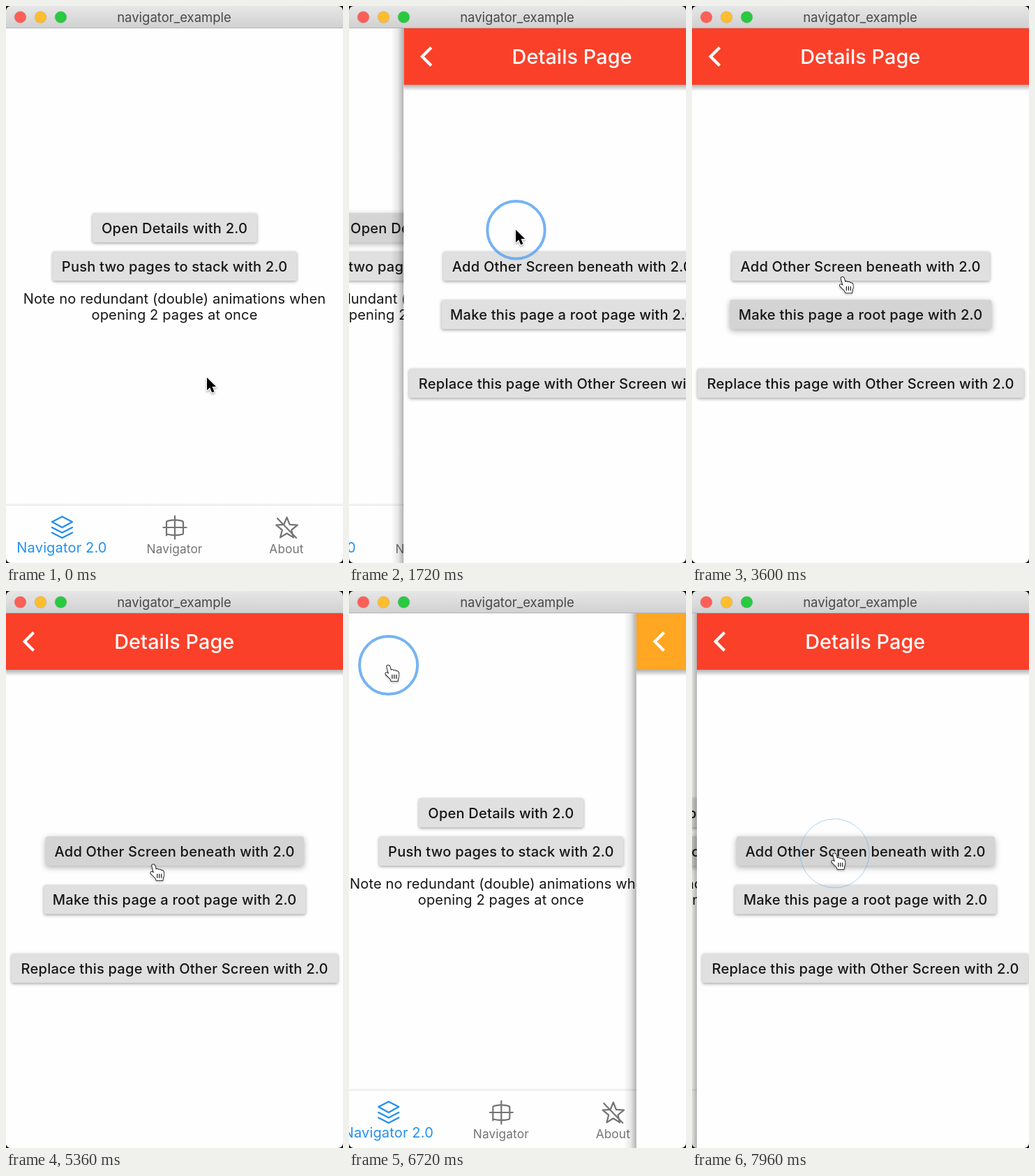
An HTML page with a canvas that plays this animation: 483x799 px, repeating every 8 s.

```html
<!DOCTYPE html>
<html lang="en">
<head>
<meta charset="utf-8">
<title>navigator_example</title>
<style>
  html, body { margin: 0; width: 100%; height: 100%; overflow: hidden; background: #000; }
  canvas { display: block; width: 483px; height: 799px; }
</style>
</head>
<body>
<canvas id="stage"></canvas>
<script>
const W = 483, H = 799, LOOP = 8000, BAR = 32, HEADER_BOTTOM = 113, SLIDE = 400;
const canvas = document.getElementById('stage');
const ctx = canvas.getContext('2d');
const dpr = window.devicePixelRatio || 1;
canvas.width = W * dpr;
canvas.height = H * dpr;

const RED = '#fb4029', ORANGE = '#ff9800', BLUE = '#2490ee', GREY = '#747474', INK = '#161616';

// Page changes: `over` slides across `under`.
const transitions = [
  { at: 1566, under: 'home', over: 'details', push: true },
  { at: 5974, under: 'other', over: 'details', push: false },
  { at: 6560, under: 'home', over: 'other', push: false },
  { at: 7650, under: 'home', over: 'details', push: true }
];
const clicks = [1566, 4700, 5974, 6560, 7650];
const HAND_FROM = 2050;

// Pointer stops: time, x, y
const stops = [
  [0, 288, 533], [250, 288, 533], [1250, 239, 321], [2050, 239, 321],
  [2450, 235, 376], [2700, 236, 376], [3050, 238, 540], [3150, 238, 540],
  [3400, 222, 441], [3510, 222, 441], [3620, 215, 384], [3900, 212, 376],
  [5150, 212, 376], [5360, 211, 392], [5440, 210, 393], [5800, 54, 103],
  [6700, 54, 103], [6990, 195, 322], [7080, 195, 324], [7160, 197, 338],
  [7420, 204, 376], [8000, 204, 376]
];

const clamp = v => Math.min(1, Math.max(0, v));
const ramp = (t, from, to) => clamp((t - from) / (to - from));

function bezier(a, b, s) {
  const r = 1 - s;
  return 3 * r * r * s * a + 3 * r * s * s * b + s * s * s;
}

function slideEase(u) {
  if (u <= 0 || u >= 1) return clamp(u);
  let lo = 0, hi = 1;
  for (let i = 0; i < 24; i++) {
    const mid = (lo + hi) / 2;
    if (bezier(0.35, 0.33, mid) < u) lo = mid; else hi = mid;
  }
  return bezier(0.91, 0.97, lo);
}

function pointerAt(t) {
  t = Math.max(0, t);
  const i = Math.max(1, stops.findIndex(s => s[0] >= t));
  const [t0, x0, y0] = stops[i - 1], [t1, x1, y1] = stops[i];
  const u = ramp(t, t0, t1), s = u * u * (3 - 2 * u);
  return { x: x0 + (x1 - x0) * s, y: y0 + (y1 - y0) * s };
}

// Hover reacts late and fades, so average a short window of the past.
function hoverAmount(t, x, y, w, h) {
  let hits = 0;
  for (let i = 0; i < 8; i++) {
    const p = pointerAt(t - 60 - i * 14);
    if (p.x >= x && p.x <= x + w && p.y >= y && p.y <= y + h) hits++;
  }
  return hits / 8;
}

function text(str, x, y, size, color, weight = 400, spacing = 0.12) {
  ctx.font = `${weight} ${size}px Inter, "Open Sans", sans-serif`;
  ctx.letterSpacing = spacing + 'px';
  ctx.textAlign = 'center';
  ctx.fillStyle = color;
  ctx.fillText(str, x, y);
}

function roundRect(x, y, w, h, r) {
  ctx.beginPath();
  ctx.roundRect(x, y, w, h, r);
}

function stroke(path, color, width) {
  ctx.strokeStyle = color;
  ctx.lineWidth = width;
  ctx.lineCap = ctx.lineJoin = 'round';
  ctx.stroke(new Path2D(path));
}

function disc(x, y, r, color) {
  ctx.fillStyle = color;
  ctx.beginPath();
  ctx.arc(x, y, r, 0, 7);
  ctx.fill();
}

function fade(x0, y0, x1, y1, from, to) {
  const g = ctx.createLinearGradient(x0, y0, x1, y1);
  g.addColorStop(0, from);
  g.addColorStop(1, to);
  return g;
}

function button(t, label, w, y) {
  const x = 241.8 - w / 2, h = 42, hover = hoverAmount(t, x, y, w, h);
  const shade = 224 - 12 * hover;
  ctx.save();
  ctx.shadowColor = `rgba(0,0,0,${0.36 - 0.04 * hover})`;
  ctx.shadowBlur = (4 + 4 * hover) * dpr;
  ctx.shadowOffsetY = (1.6 + hover) * dpr;
  ctx.fillStyle = `rgb(${shade},${shade},${shade})`;
  roundRect(x, y, w, h, 3);
  ctx.fill();
  ctx.restore();
  text(label, 241.6, y + 28.7, 20.1, INK, 500, 0.2);
}

function header(t, title, color, poppedAt) {
  ctx.fillStyle = fade(0, HEADER_BOTTOM, 0, HEADER_BOTTOM + 9, 'rgba(0,0,0,.3)', 'rgba(0,0,0,0)');
  ctx.fillRect(0, HEADER_BOTTOM, W, 9);
  ctx.fillStyle = color;
  ctx.fillRect(0, BAR, W, HEADER_BOTTOM - BAR);

  const splash = ramp(t, poppedAt - 110, poppedAt + 40);
  const alpha = 0.2 * splash * (1 - ramp(t, poppedAt + 100, poppedAt + 300));
  if (alpha > 0) {
    ctx.save();
    ctx.beginPath();
    ctx.rect(0, BAR, W, HEADER_BOTTOM - BAR);
    ctx.clip();
    disc(32, 72.5, 25 + 34.5 * splash, `rgba(255,255,255,${alpha})`);
    ctx.restore();
  }
  ctx.strokeStyle = '#fff';
  ctx.lineWidth = 4.2;
  ctx.lineCap = 'butt';
  ctx.lineJoin = 'miter';
  ctx.stroke(new Path2D('M39.6 59.6L26.6 72.5L39.6 85.6'));
  text(title, 241.3, 83, 28.75, '#fff', 500, 0.1);
}

function starPath(cx, cy, outer, inner) {
  let d = '';
  for (let i = 0; i < 10; i++) {
    const a = i * Math.PI / 5 - Math.PI / 2, r = i % 2 ? inner : outer;
    d += `${i ? 'L' : 'M'}${cx + r * Math.cos(a)} ${cy + r * Math.sin(a)}`;
  }
  return d + 'Z';
}

const pages = {
  home(t) {
    button(t, 'Open Details with 2.0', 236, 297);
    button(t, 'Push two pages to stack with 2.0', 350, 352);
    text('Note no redundant (double) animations when', 241.5, 427, 20.1, INK);
    text('opening 2 pages at once', 241.5, 450, 20.1, INK);

    ctx.fillStyle = fade(0, 713, 0, 717, 'rgba(0,0,0,0)', 'rgba(0,0,0,.09)');
    ctx.fillRect(0, 713, W, 4);

    stroke('M66 740L80.5 732.5L95 740L80.5 748ZM66 748L80.5 755.5L95 748M66 755.5L80.5 763L95 755.5', BLUE, 2.4);
    stroke('M225.5 748H258.5M242 731.5V764.5', GREY, 2.2);
    stroke('M230 759.5V741Q230 739 232 738.6Q242 736 252 738.6Q254 739 254 741V756Q254 758 252 758Q242 760.5 230 757.5', GREY, 2.2);
    stroke(starPath(402.5, 749.5, 16, 7), GREY, 2.2);
    stroke('M389 735L416 763', GREY, 2.2);

    text('Navigator 2.0', 80, 784.3, 20.1, BLUE);
    text('Navigator', 241.5, 785, 17.25, GREY);
    text('About', 402, 785, 17.25, GREY);
  },
  details(t) {
    button(t, 'Add Other Screen beneath with 2.0', 370, 352);
    button(t, 'Make this page a root page with 2.0', 375, 421.5);
    button(t, 'Replace this page with Other Screen with 2.0', 468, 520);
    header(t, 'Details Page', RED, 5974);
  },
  other(t) {
    text('Other Screen', 241.5, 465, 20.1, INK);
    header(t, 'Other Screen', ORANGE, 6560);
  }
};

function drawPage(name, x, t) {
  if (x >= W) return;
  ctx.save();
  ctx.translate(x, 0);
  if (x > 0) {
    const edge = fade(-18, 0, 0, 0, 'rgba(0,0,0,0)', 'rgba(0,0,0,.3)');
    edge.addColorStop(0.55, 'rgba(0,0,0,.09)');
    ctx.fillStyle = edge;
    ctx.fillRect(-18, BAR, 18, H);
  }
  ctx.beginPath();
  ctx.rect(0, BAR, W, H - BAR);
  ctx.clip();
  ctx.fillStyle = '#fefefe';
  ctx.fillRect(0, BAR, W, H);
  pages[name](t);
  ctx.restore();
}

function drawPages(t) {
  const now = transitions.filter(c => c.at <= t).pop();
  if (!now) return drawPage('home', 0, t);
  const p = slideEase((t - now.at) / SLIDE);
  const cover = now.push ? p : 1 - p;
  drawPage(now.under, -W / 3 * cover, t);
  drawPage(now.over, W * (1 - cover), t);
}

function drawTooltip(t) {
  const alpha = ramp(t, 5760, 5880) * (1 - ramp(t, 5974, 6046));
  if (!alpha) return;
  ctx.save();
  ctx.globalAlpha = alpha;
  ctx.fillStyle = 'rgba(97,97,97,.9)';
  roundRect(16, 107, 93, 46, 5);
  ctx.fill();
  text('Back', 62.5, 137, 20.1, '#fff');
  ctx.restore();
}

function drawTitleBar() {
  ctx.fillStyle = fade(0, 0, 0, BAR, '#e7e7e7', '#d0d0d0');
  ctx.fillRect(0, 0, W, BAR);
  ctx.fillStyle = '#b3b3b3';
  ctx.fillRect(0, BAR - 1, W, 1);
  ['#fc5f58', '#fdbd2e', '#29c941'].forEach((color, i) => {
    disc(20.5 + 29 * i, 16, 8.8, 'rgba(0,0,0,.15)');
    disc(20.5 + 29 * i, 16, 8.3, color);
  });
  text('navigator_example', 241, 23, 18.5, '#484848', 400, 0);
}

function drawRing(t, p) {
  for (const click of clicks) {
    const d = t - click;
    if (d < -110 || d > 370) continue;
    const thin = ramp(d, 160, 310);
    const alpha = 0.8 * ramp(d, -110, -40) * (1 - 0.4 * thin) * (1 - ramp(d, 310, 370));
    ctx.strokeStyle = `rgba(84,160,240,${alpha})`;
    ctx.lineWidth = 4 - 3 * thin;
    ctx.beginPath();
    ctx.arc(p.x + 0.5, p.y + 0.3, 33 + 0.053 * Math.max(0, d), 0, 7);
    ctx.stroke();
  }
}

const arrow = new Path2D('M0 0V18.2L4.2 14.3L7.2 21.6L10.5 20.2L7.5 13.1H13.1Z');
const hand = new Path2D('M4.2 3.6C3.6 1 7.4 .2 8.3 2.8L10 8.6C11 7.2 13.2 7.4 13.6 9C14.8 8 16.8 8.4 17.3 10' +
  'C18.8 9.2 20.8 10 21 12.2C21.7 15 21.5 17 20.3 19.6L19.6 24H10.6L9.3 21L3 14.8C1.2 12.4 3.4 11 5.4 12.4L6.9 13.6Z');

function drawPointer(t, p) {
  const isHand = t >= HAND_FROM;
  const shape = isHand ? hand : arrow;
  ctx.save();
  ctx.translate(p.x - (isHand ? 6 : 0), p.y - (isHand ? 1 : 0));
  ctx.lineJoin = 'round';
  ctx.shadowColor = 'rgba(0,0,0,.35)';
  ctx.shadowBlur = 3 * dpr;
  ctx.shadowOffsetY = 1.5 * dpr;
  ctx.lineWidth = isHand ? 1.6 : 2.6;
  ctx.strokeStyle = isHand ? '#000' : '#fff';
  ctx.stroke(shape);
  ctx.shadowColor = 'transparent';
  ctx.fillStyle = isHand ? '#fff' : '#000';
  ctx.fill(shape);
  if (isHand) stroke('M11.8 15V20.2M14.8 15V20.2M17.8 15V20.2', '#000', 1.1);
  ctx.restore();
}

function draw(t) {
  ctx.setTransform(dpr, 0, 0, dpr, 0, 0);
  ctx.fillStyle = '#111';
  ctx.fillRect(0, 0, W, H);
  ctx.save();
  roundRect(0, 0, W, H, 7);
  ctx.clip();
  drawPages(t);
  drawTooltip(t);
  drawTitleBar();
  ctx.restore();
  const p = pointerAt(t);
  drawRing(t, p);
  drawPointer(t, p);
}

const start = performance.now();
function tick() {
  draw((performance.now() - start) % LOOP);
  requestAnimationFrame(tick);
}
tick();
</script>
</body>
</html>
```
